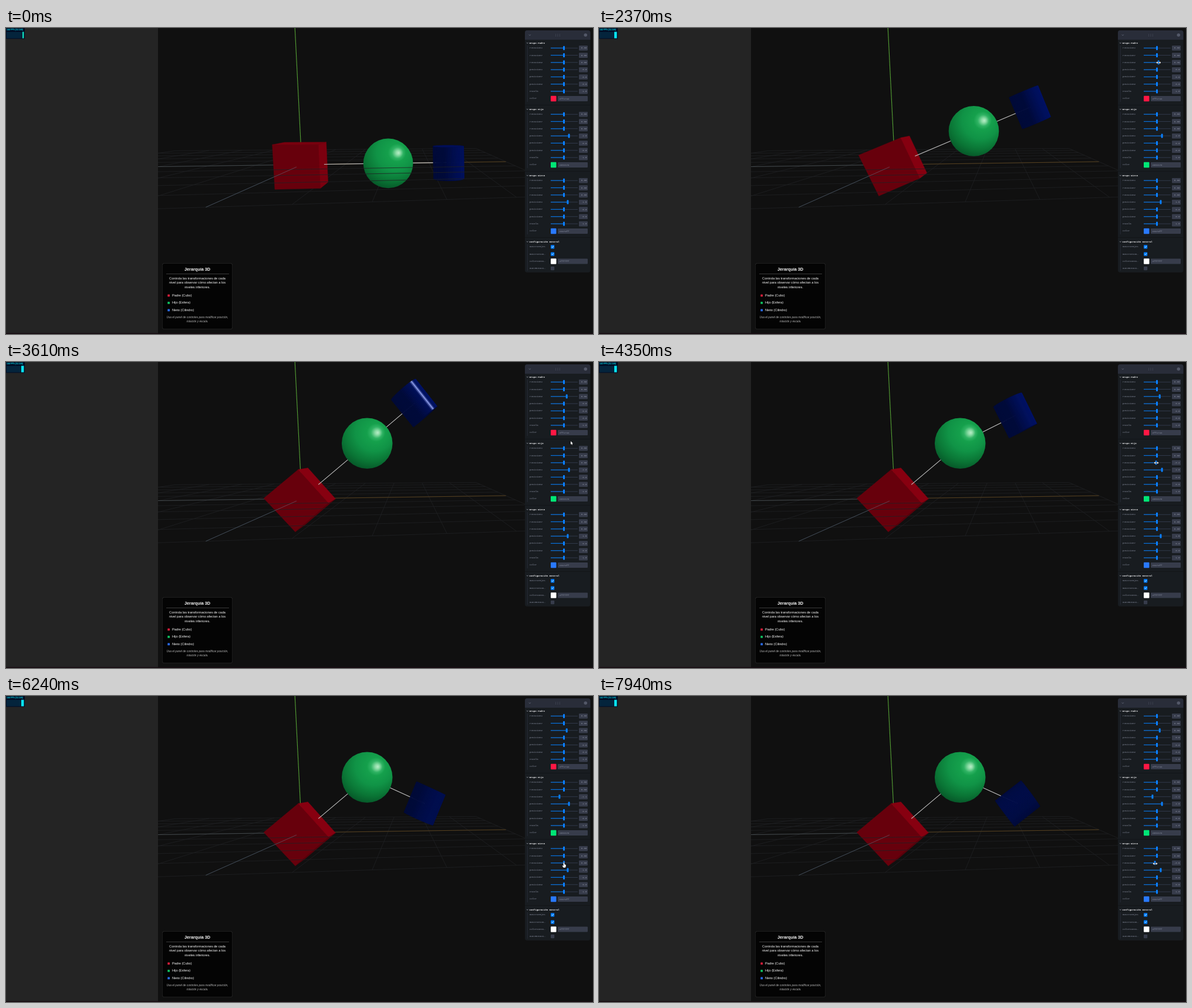
Recreate the animation shown at these times as an HTML page with a canvas. Size 1000x522 px, loop 8 s.

```html
<!DOCTYPE html>
<html lang="es">
<head>
<meta charset="utf-8">
<title>Jerarquía 3D</title>
<style>
html, body { margin: 0; height: 100%; overflow: hidden; background: #101010; }
canvas { display: block; }
</style>
</head>
<body>
<canvas id="stage" width="1000" height="522"></canvas>
<script>
const ctx = document.getElementById('stage').getContext('2d');
const LOOP = 8000;
const SANS = '"Liberation Sans", Arial, sans-serif';
const MONO = '"Liberation Mono", monospace';
const LIGHT = [.67, .6, .27], HALF = [.42, .44, .79];

// Keyframes: [time, value, ...]
const PARENT_TURN = [[2000, 0], [2350, .38], [2760, .64], [3000, .69]];
const CHILD_TURN = [[4200, 0], [4600, -.6], [5020, -1.16], [5300, -1.11]];
const GRANDCHILD_TURN = [[6700, 0], [7300, -.28], [7940, -.51]];
const POINTER = [[900, 1004, 150], [1200, 958, 128], [1530, 950.5, 98], [1850, 950.5, 59], [2000, 950.5, 59],
  [2760, 956, 59], [3050, 956, 59], [3610, 962, 135], [4000, 951, 172], [4200, 951, 172],
  [5020, 942.5, 172], [5350, 943, 172], [5800, 957, 250], [6240, 950.5, 284], [6700, 951, 286], [7940, 947.5, 286]];

function track(keys, t) {
  if (t <= keys[0][0]) return keys[0].slice(1);
  for (let i = 1; i < keys.length; i++) {
    const [a, b] = [keys[i - 1], keys[i]];
    if (t < b[0]) {
      const k = (t - a[0]) / (b[0] - a[0]);
      return a.slice(1).map((v, j) => v + (b[j + 1] - v) * k);
    }
  }
  return keys[keys.length - 1].slice(1);
}

// ---- 3D helpers ----
const dot = (a, b) => a[0] * b[0] + a[1] * b[1] + a[2] * b[2];
const add = (...vs) => [0, 1, 2].map(i => vs.reduce((s, v) => s + v[i], 0));
const mul = (v, k) => v.map(c => c * k);
const depth = ([x, y, z]) => 1 + .0201 * x - .01 * y - .0955 * z;

function project(p) {
  const [x, y, z] = p, w = depth(p);
  return [504 + (76.5 * x - 3.75 * y - 17.1 * z) / w, 233 + (-1.1 * x - 74 * y + 7.6 * z) / w];
}

function line(a, b, color, width = 1) {
  ctx.strokeStyle = color;
  ctx.lineWidth = width;
  ctx.beginPath();
  ctx.moveTo(...project(a));
  ctx.lineTo(...project(b));
  ctx.stroke();
}

function face(points, color) {
  const s = points.map(project);
  const area = s.reduce((sum, [x, y], i) => {
    const [u, v] = s[(i + 1) % s.length];
    return sum + x * v - u * y;
  }, 0);
  if (area >= 0) return;
  ctx.fillStyle = ctx.strokeStyle = color;
  ctx.lineWidth = .5;
  ctx.beginPath();
  s.forEach(p => ctx.lineTo(...p));
  ctx.closePath();
  ctx.fill();
  ctx.stroke();
}

function shade(normal, base, ambient, diffuse, gloss = 0) {
  const lit = ambient + diffuse * Math.max(0, dot(normal, LIGHT));
  const spec = gloss * Math.max(0, dot(normal, HALF)) ** 220;
  return `rgb(${base.map(c => Math.min(255, c * lit + 255 * spec)).join()})`;
}

const axes = a => [[Math.cos(a), Math.sin(a), 0], [-Math.sin(a), Math.cos(a), 0], [0, 0, 1]];

function cube(angle) {
  const [x, y, z] = axes(angle);
  const side = (u, v, n) => face(
    [[-1, -1], [1, -1], [1, 1], [-1, 1]].map(([i, j]) => mul(add(n, mul(u, i), mul(v, j)), .486)),
    shade(n, [255, 0, 30], .35, .2));
  for (const [u, v, n] of [[x, y, z], [y, z, x], [z, x, y]]) {
    side(u, v, n);
    side(v, u, mul(n, -1));
  }
}

function sphere(center) {
  const [x, y] = project(center), r = .58 * 76 / depth(center);
  const g = ctx.createRadialGradient(x + .42 * r, y - .42 * r, 0, x + .15 * r, y - .45 * r, 1.5 * r);
  [[0, '#b8eec8'], [.06, '#8cdca6'], [.15, '#2fb363'], [.24, '#15a04c'], [.5, '#109346'], [.78, '#0a7535'], [1, '#065628']]
    .forEach(s => g.addColorStop(...s));
  ctx.fillStyle = g;
  ctx.beginPath();
  ctx.arc(x, y, r, 0, 7);
  ctx.fill();
}

function cylinder(center, angle) {
  const [u, axis, z] = axes(angle), N = 72, blue = [2, 42, 245];
  const normal = i => {
    const a = i / N * 2 * Math.PI;
    return add(mul(u, Math.cos(a)), mul(z, Math.sin(a)));
  };
  const rim = (i, h) => add(center, mul(normal(i), .386), mul(axis, h));
  const ring = h => Array.from({ length: N }, (_, i) => rim(i, h));
  for (let i = 0; i < N; i++)
    face([rim(i + 1, -.4), rim(i, -.4), rim(i, .4), rim(i + 1, .4)], shade(normal(i + .5), blue, .24, .2, 1.9));
  face(ring(.4).reverse(), shade(axis, blue, .24, .2));
  face(ring(-.4), shade(mul(axis, -1), blue, .24, .2));
}

function scene(p, c, g) {
  const grid = 'rgba(32,33,35,.8)';
  for (let i = -5; i <= 5; i++) {
    if (i < 1) line([-5, 0, i], [5, 0, i], grid);
    line([i, 0, -5], [i, 0, 5], grid);
  }
  line([-5, 0, 0], [0, 0, 0], '#43494c');
  line([0, 0, 0], [5, 0, 0], '#57411f');
  line([0, 0, 0], [0, 3.2, 0], '#55a035', 1.1);

  const child = [2 * Math.cos(p), 2 * Math.sin(p), 0];
  const grandchild = add(child, [1.5 * Math.cos(p + c), 1.5 * Math.sin(p + c), 0]);
  cube(p);
  line(mul(child, .25), child, '#c4c4c4', 1.1);
  line(child, grandchild, '#c4c4c4', 1.1);
  sphere(child);
  cylinder(grandchild, p + c + g);

  for (let i = 1; i <= 5; i++) line([-5, 0, i], [5, 0, i], grid);
  line([0, 0, .5], [0, 0, 5], 'rgba(110,130,150,.48)');
}

// ---- 2D interface ----
function box(x, y, w, h, color, r = 0) {
  ctx.fillStyle = color;
  ctx.beginPath();
  ctx.roundRect(x, y, w, h, r);
  ctx.fill();
}

function text(str, x, y, font, color, align = 'left') {
  ctx.font = font;
  ctx.fillStyle = color;
  ctx.textAlign = align;
  ctx.textBaseline = 'middle';
  ctx.fillText(str, x, y);
}

function stroke(points, color, width) {
  ctx.strokeStyle = color;
  ctx.lineWidth = width;
  ctx.beginPath();
  points.forEach(p => ctx.lineTo(...p));
  ctx.stroke();
}

function legend() {
  box(266, 401, 120, 113, '#262626', 4);
  box(266.7, 401.7, 118.6, 111.6, '#040404', 3.5);
  text('Jerarquía 3D', 326, 412, `bold 7.26px ${SANS}`, '#fff', 'center');
  box(273, 419, 107, 1, '#3a3a3a');
  ['Controla las transformaciones de cada', 'nivel para observar cómo afectan a los', 'niveles inferiores.']
    .forEach((s, i) => text(s, 326, 427.3 + 7.5 * i, `5.6px ${SANS}`, '#fff', 'center'));
  [['Padre (Cubo)', '#d81e3a'], ['Hijo (Esfera)', '#0fc060'], ['Nieto (Cilindro)', '#2a6cf0']].forEach(([s, color], i) => {
    const y = 456 + 12.5 * i;
    box(275.3, y - 1.4, 3.7, 3.7, color, .4);
    text(s, 283, y, `5.6px ${SANS}`, '#fff');
  });
  ['Usa el panel de controles para modificar posición,', 'rotación y escala.']
    .forEach((s, i) => text(s, 326, 493.3 + 7 * i, `italic 4.75px ${SANS}`, '#b8b8b8', 'center'));
}

const label = (s, y) => text(s, 892, y, `4.05px ${MONO}`, '#8c92a4');

function slider(name, y, value, min, max, digits) {
  const x = 929 + 43 * (value - min) / (max - min);
  label(name, y);
  box(928, y - .5, 46, 1, '#30394a');
  box(928, y - .6, x - 928, 1.2, '#0670dd');
  box(x - 1.5, y - 3.5, 3, 7, '#0a80ff', .8);
  box(976, y - 4.2, 15, 8.6, '#373c4b', 1);
  text(value.toFixed(value < 0 ? 1 : digits), 989.5, y + .2, `4.05px ${MONO}`, '#9298a8', 'right');
}

function swatch(name, y, color) {
  label(name, y);
  box(928, y - 4.5, 9.5, 9.5, color, 1);
  box(940, y - 4.2, 51, 8.8, '#373c4b', 1);
  text(color, 942.5, y + .2, `4.05px ${MONO}`, '#8c92a4');
}

function checkbox(name, y, on) {
  label(name, y);
  box(928, y - 3, 6.2, 6.2, on ? '#007bff' : '#373c4b', 1);
  if (on) stroke([[929.5, y], [930.8, y + 1.3], [932.8, y - 1.2]], '#fff', .8);
}

function folder(title, y) {
  stroke([[887, y - .6], [888.3, y + .8], [889.6, y - .6]], '#b0b4c0', .7);
  text(title, 891.5, y, `bold 4.05px ${MONO}`, '#f2f2f4');
}

function panel(turns) {
  box(884, 4, 111.5, 413, '#181c20', 4);
  box(884, 4, 111.5, 16, '#292d39', [4, 4, 0, 0]);
  stroke([[890.8, 11.3], [892.3, 12.8], [893.8, 11.3]], '#6a7082', .9);
  for (let i = 0; i < 6; i++) box(936 + 3.4 * (i % 3), i < 3 ? 10.4 : 13, 1, 1, '#535868');
  ctx.beginPath();
  ctx.arc(987.3, 12, 2.8, 0, 7);
  ctx.fillStyle = '#535868';
  ctx.fill();

  const groups = [['Grupo Padre', '#ff1744', 0], ['Grupo Hijo', '#00e676', 2], ['Grupo Nieto', '#2979ff', 1.5]];
  groups.forEach(([title, color, posX], g) => {
    const top = 113 * g, row = i => top + 34.2 + 12.3 * i;
    folder(title, top + 25.5);
    box(887.8, top + 30, .8, 96, '#2b303b');
    box(884, top + 131, 111.5, .8, '#101316');
    [...'XYZ'].forEach((a, i) => {
      slider('rotacion' + a, row(i), i === 2 ? turns[g] : 0, -Math.PI, Math.PI, 2);
      slider('posicion' + a, row(i + 3), i ? 0 : posX, -5, 5, 1);
    });
    slider('escala', row(6), 1, 0, 2, 1);
    swatch('color', row(7), color);
  });
  folder('Configuración General', 364.5);
  box(887.8, 369, .8, 45, '#2b303b');
  checkbox('mostrarEjes', 373.2, true);
  checkbox('mostrarCon…', 385.5, true);
  swatch('colorConex…', 397.8, '#ffffff');
  checkbox('autoRotaci…', 410, false);
}

function meter(t) {
  box(0, 0, 32, 18.5, '#000a22');
  text(`${144 - Math.floor(t / 950) % 3} FPS (52-144)`, 1, 3, `bold 3.5px ${SANS}`, '#00d8e8');
  box(1, 6.5, 29.5, 11, '#04243c');
  const w = Math.min(4.5, 2.5 + t / 1200);
  box(30.5 - w, 6.5, w, 11, t < 900 ? '#10d8b8' : '#08e4f0');
}

const SHAPES = {
  arrow: [[0, 0], [0, 5.6], [1.3, 4.5], [2.2, 6.3], [3.1, 5.9], [2.3, 4.1], [3.9, 4]],
  hand: [[-.8, 0], [.6, 0], [.8, 3], [3.4, 4], [3.2, 7], [2.2, 8.8], [-.9, 8.8], [-3, 5.6], [-2.4, 4.9], [-.9, 6]],
  drag: [[-4, 0], [-1.8, -2], [-1.8, -.6], [1.8, -.6], [1.8, -2], [4, 0], [1.8, 2], [1.8, .6], [-1.8, .6], [-1.8, 2]]
};

function pointer(t) {
  if (t < 900) return;
  const within = (a, b) => t >= a && t < b;
  const dragging = within(2000, 3000) || within(4200, 5350) || t >= 6700;
  const roaming = t < 1300 || within(3100, 3900) || within(5450, 6100);
  const [x, y] = track(POINTER, t);
  ctx.beginPath();
  SHAPES[dragging ? 'drag' : roaming ? 'arrow' : 'hand'].forEach(([dx, dy]) => ctx.lineTo(x + dx, y + dy));
  ctx.closePath();
  ctx.strokeStyle = '#111';
  ctx.lineWidth = .8;
  ctx.stroke();
  ctx.fillStyle = '#fff';
  ctx.fill();
}

function draw(now) {
  const t = now % LOOP;
  const turns = [PARENT_TURN, CHILD_TURN, GRANDCHILD_TURN].map(keys => track(keys, t)[0]);
  box(0, 0, 1000, 522, '#101010');
  scene(...turns);
  box(0, 0, 259, 522, '#242424');
  box(0, 520.5, 1000, 1.5, '#160a10');
  meter(t);
  legend();
  panel(turns);
  pointer(t);
  requestAnimationFrame(draw);
}
requestAnimationFrame(draw);
</script>
</body>
</html>
```
